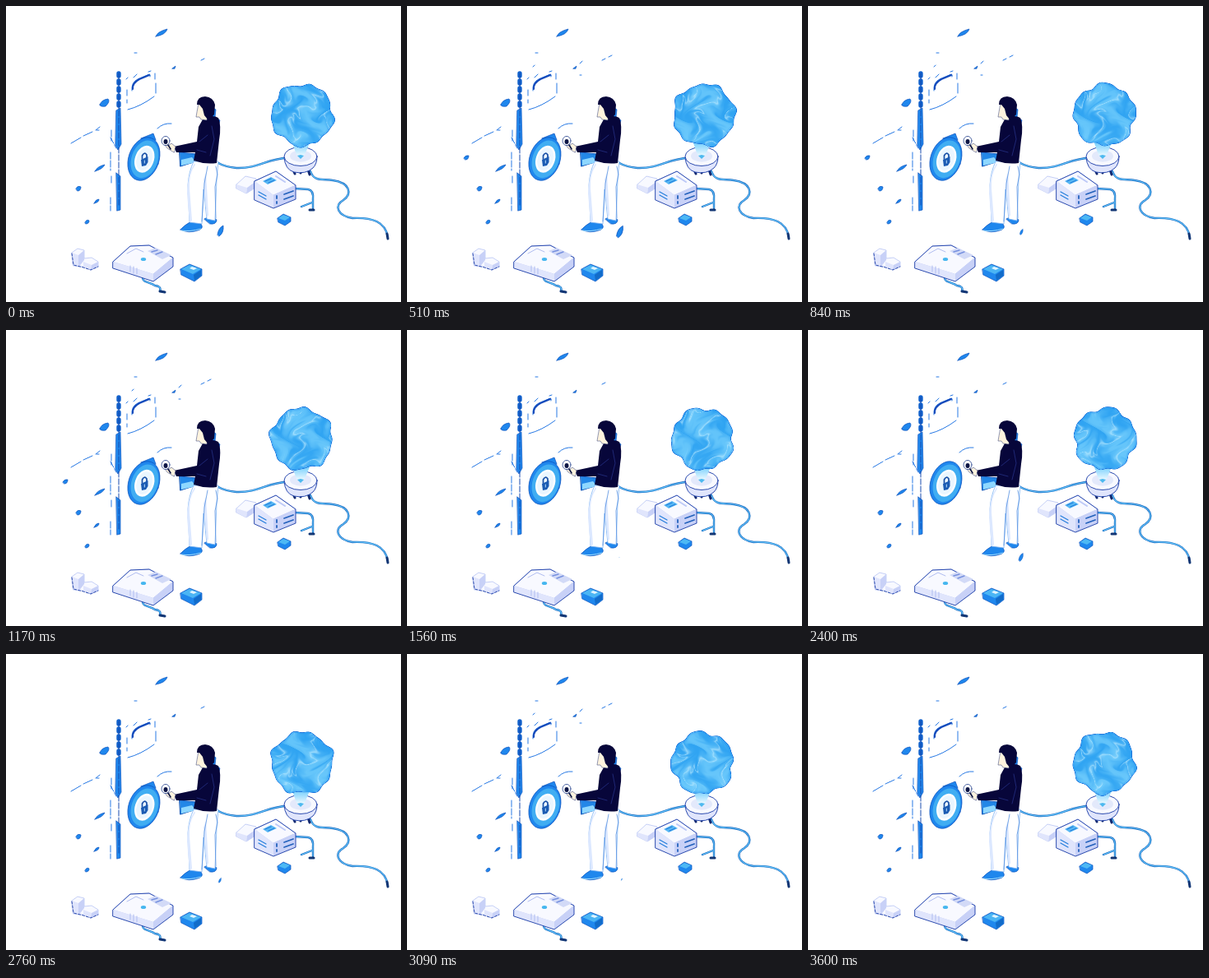
An HTML page with a canvas for the animation above (3.63 s loop, 480 by 360 pixels).

```html
<!DOCTYPE html>
<html lang="en">
<head>
<meta charset="utf-8">
<title>Digital workspace</title>
<style>
html, body { margin: 0; width: 100%; height: 100%; overflow: hidden; background: #fff; }
svg, canvas { position: absolute; left: 0; top: 0; }
canvas { left: 312px; top: 84px; }
svg { fill: none; stroke-linecap: round; stroke-linejoin: round; }
.blue { fill: #1f87ed; stroke: #0b51bd; stroke-width: .7; }
.pale { fill: #fff; stroke: #aebcf3; stroke-width: .7; }
.top { fill: #f8f9ff; }
.left { fill: #e0e5fc; }
.right { fill: #c8d1f7; }
.edge { stroke: #1739a6; stroke-width: .9; }
.line { stroke: #2678e4; stroke-width: 1; }
.navy { fill: #07063a; }
.skin { fill: #fff3de; stroke: #26346f; stroke-width: .5; }
.cord { stroke: #1463bd; stroke-width: 2.4; }
.shine { stroke: #63c5fa; stroke-width: 1.1; }
</style>
</head>
<body>
<svg width="480" height="360" viewBox="0 0 480 360">
  <defs>
    <linearGradient id="beam" x1="0" y1="0" x2="0" y2="1">
      <stop stop-color="#66c9fc"/><stop offset="1" stop-color="#eefaff"/>
    </linearGradient>
  </defs>

  <!-- panel fragments -->
  <g class="blue">
    <path d="M182 37Q184 31 196 28Q194 35 182 37Z"/>
    <path d="M114 120Q116 114 124 113Q127 116 121 122Q114 123 114 120Z"/>
    <path d="M108 201Q111 195 120 193Q118 198 108 201Z"/>
    <path d="M85 222Q87 218 91 220Q91 225 87 225Z"/>
    <path d="M107 240Q109 235 113 235Q113 239 107 240Z"/>
    <path d="M96 263Q98 259 101 261Q101 265 97 265Z"/>
    <path d="M134 127L139 124L140 168L136 175L133 169Z"/>
    <path d="M134 203L139 207V248L135 249Z"/>
    <path d="M202 76L206 73L205 76Z"/>
  </g>
  <path d="M137 82V123" stroke="#1262cd" stroke-width="5.4" stroke-dasharray="3 6"/>
  <path d="M137 82V244" stroke="#164aae" stroke-width="1" stroke-dasharray="7 2"/>
  <path class="line" d="M128 151V164M127 160L134 173M127 178V200M128 207V217M127 233V249" stroke-dasharray="8 2"/>
  <path class="line" d="M79 167L91 160M94 158L105 153M109 151L114 147M110 151H113" stroke-width="1.4"/>
  <path class="line" d="M153 103Q152 93 160 89L174 83Q176 83 175 86M147 102V109M147 114V118M148 126Q164 122 180 110" stroke-width="1.7"/>
  <path class="line" d="M181 82V89M182 94V106M173 80L176 79M155 87L159 83M156 57H159M146 89L148 87" stroke-width=".7"/>
  <path d="M154 101Q153 94 162 89L174 84" stroke="#164bbb" stroke-width="2.2"/>
  <path class="line" d="M184 149Q191 142 201 143" stroke-width="1.6"/>
  <path class="line" d="M237 66L241 64" stroke-width="1.2"/>
  <g id="sparks" class="line"><path d="M210 70L213 67M210 84H212M245 62L249 60M153 74L155 72"/></g>
  <path id="chip" class="blue" d="M69 185Q71 181 75 182Q75 187 71 187Z"/>

  <!-- lock badge -->
  <path id="tip" class="blue" d="M164 161L179 155L182 163Z"/>
  <g transform="translate(167.5 186) rotate(19)">
    <ellipse class="blue" rx="18.5" ry="27"/>
    <ellipse cx="1" rx="16" ry="23.5" fill="#40adf2"/>
    <ellipse cx=".8" rx="11.5" ry="17" fill="#fff"/>
    <ellipse cx=".8" rx="9.5" ry="14.3" fill="#eaf6ff"/>
  </g>
  <path d="M165.5 186V182Q168 177 171 181V184" stroke="#174ea5" stroke-width="1.7"/>
  <path d="M164 187L172.5 183V190L170 194L165 195Z" fill="#1a5bb3"/>
  <path d="M168.3 188V191" stroke="#b9e2ff" stroke-width="1"/>

  <!-- cords -->
  <g id="cords">
    <path d="M256 190Q267 196 280 197C307 198 318 185 342 185"/>
    <path d="M370 201C374 214 385 210 397 212C418 215 421 228 410 236C398 243 403 255 421 258C445 257 461 262 464 281"/>
    <path d="M351 222L367 223Q374 224 373 235V246M372 239L359 244"/>
    <path d="M166 330C166 337 174 335 181 340Q189 341 187 346L192 348"/>
  </g>
  <path d="M463 277L464 283M369 248H374M187 347L193 348" stroke="#123674" stroke-width="3"/>

  <!-- lamp -->
  <path d="M348 197L351 204M367 199L369 205M358 199V203" stroke="#122a70" stroke-width="3"/>
  <path class="left edge" d="M338 184Q339 199 350 202Q364 205 373 197Q378 192 378 183Z"/>
  <ellipse class="top edge" cx="358" cy="183" rx="20" ry="11.5" stroke-width=".6"/>
  <ellipse cx="358" cy="182.5" rx="13" ry="7.2" fill="#e3e9fb"/>
  <path d="M347 164H370L363 181Q358 184 353 181Z" fill="url(#beam)"/>
  <path d="M354 182L358 181L362 182L358 186Z" fill="#4db9ef"/>

  <!-- server and small cube -->
  <path class="pale top" d="M280 217L291 207L304 210L303 221L292 228L280 222Z"/>
  <path class="left" d="M280 217L293 221L292 228L280 222Z"/>
  <path class="right" d="M293 221L304 213L303 221L292 228Z"/>
  <path class="pale top" d="M302 213L328 201L352 218L325 230Z"/>
  <path class="left" d="M302 213L325 230V246L302 236Z"/>
  <path class="right" d="M325 230L352 218V235L325 246Z"/>
  <path class="edge" d="M302 213L328 201L352 218V235L325 246L302 236Z" stroke-width=".6"/>
  <path d="M312 213L322 208L329 212L318 217Z" fill="#58b9f4"/>
  <path d="M315 213L322 210M319 215L326 212M307 226L316 231M307 230L316 235" stroke="#267fdc" stroke-width="1.3"/>
  <path d="M338 229L349 225M338 235L349 231M329 231V234M329 238V240" stroke="#2462bc" stroke-width="1.8"/>
  <path d="M328 207L339 214" stroke="#bdc9f7" stroke-width="2"/>
  <path class="blue" d="M330 258L337 253L346 257V262L339 267L331 263Z"/>
  <path d="M331 258L337 254L345 257L339 261Z" fill="#4db8f4"/>

  <!-- foreground equipment -->
  <path class="pale top" d="M80 300L87 295L95 297V307L104 306L112 311V317L103 321L94 317L82 316Z"/>
  <path class="left" d="M80 300L88 303V318L81 314ZM94 311L104 315L103 321L94 317Z"/>
  <path class="right" d="M88 303L95 297V309L88 318ZM104 315L112 311V317L103 321Z"/>
  <path class="edge" d="M80 301L82 315L94 318L103 321L112 317" stroke-width=".7" stroke-dasharray="3 2"/>
  <path class="pale top" d="M130 311L151 292L174 291L203 306L179 326Z"/>
  <path class="left" d="M130 311L157 319L179 326V335L130 319Z"/>
  <path class="right" d="M179 326L203 306V317L179 335Z"/>
  <path class="edge" d="M130 311L151 292L174 291L203 306V317L179 335L130 319Z" stroke-width=".7"/>
  <path d="M172 298L182 294L201 303L190 308Z" fill="#d2daf7"/>
  <path d="M177 299L184 297M182 302L190 299" stroke="#7791df" stroke-width="1.4"/>
  <path d="M147 301L158 295L167 299M151 316V323M155 317V325M159 319V326" stroke="#b0bdf0"/>
  <ellipse cx="167" cy="308" rx="3.2" ry="2.1" fill="#46b7ef"/>
  <path class="blue" d="M212 320L223 314L238 320V328L229 335L213 327Z"/>
  <path d="M213 320L223 315L237 320L227 326Z" fill="#4bb5f4"/>
  <path d="M226 317L232 319L228 321L223 319Z" fill="#e1f5ff"/>
  <path d="M228 327L237 321V328L229 334Z" fill="#126cc9"/>

  <!-- person -->
  <path d="M211 178L231 180L228 190L212 195Z" fill="#2387e7" stroke="#1457b7"/>
  <path d="M213 187L226 184L231 190L213 194Z" fill="#8ed7ff"/>
  <path class="blue" d="M212 272Q216 267 225 262L237 265Q241 271 233 273Q222 277 212 272Z"/>
  <path class="blue" d="M241 259L249 255L256 260Q256 266 248 265Z"/>
  <path d="M213 273Q223 275 237 271" stroke="#9bdcff"/>
  <path d="M228 189H258L256 211L254 261L244 259L240 223L238 265L223 263L221 218Q222 202 228 189Z" fill="#fff" stroke="#7db4f4" stroke-width=".8"/>
  <path d="M230 193Q222 204 223 222L226 261L223 263L220 228Q220 207 229 191ZM240 211L243 203L246 254L244 258Z" fill="#dce8ff"/>
  <path d="M245 195L241 216L238 262M255 195L257 205L254 220L255 258" stroke="#548fe0" stroke-width=".8"/>
  <path class="blue" d="M249 122L255 126L254 135L260 139L257 149L248 136Z"/>
  <path class="navy" d="M239 138Q250 131 258 136Q262 145 259 163L256 191Q242 193 228 188L230 178L207 178L204 171L232 165L234 147Z"/>
  <path d="M235 165L245 157M232 175L243 178M250 146L253 162L248 182" stroke="#253085" stroke-width=".8"/>
  <path class="skin" d="M234 120L241 118L246 128L244 139L237 138L235 135H231L232 129Z"/>
  <path class="navy" d="M232 120Q232 110 242 110Q252 111 254 120L253 132L246 139L241 133L239 125L235 120Z"/>
  <path class="skin" d="M206 171L201 167L197 170L193 169L196 173L204 178Z"/>
  <ellipse cx="194" cy="164" rx="5" ry="5.6" fill="#fff" stroke="#28458f" stroke-width=".8"/>
  <ellipse cx="194" cy="165" rx="2.5" ry="3" fill="#0c1646"/>
  <path d="M197 169L200 174" stroke="#0c1646" stroke-width="1.6"/>
  <path id="leaf" class="blue" d="M-4 5Q-3 -3 3 -6Q4 3 -2 7Z"/>
</svg>
<canvas width="96" height="96"></canvas>
<script>
const LOOP = 3630, SIZE = 96;
const $ = id => document.getElementById(id);
const ctx = document.querySelector('canvas').getContext('2d');
const pixels = ctx.createImageData(SIZE, SIZE);
const leafPose = [[0, 1, 261, 273], [510, 1.1, 259, 274], [1170, 0, 260, 275],
  [1950, .15, 256, 278], [2400, .75, 259, 276], [3090, .2, 261, 274], [3630, 0, 261, 274]];

for (const path of [...$('cords').children]) {
  path.setAttribute('class', 'cord');
  const highlight = path.cloneNode();
  highlight.setAttribute('class', 'shine');
  $('cords').append(highlight);
}

function poseAt(t) {
  const i = leafPose.findIndex(p => p[0] > t);
  const a = leafPose[i - 1], b = leafPose[i];
  const k = (t - a[0]) / (b[0] - a[0]);
  return a.slice(1).map((v, j) => v + (b[j + 1] - v) * k);
}

function show(id, visible) {
  $(id).style.visibility = visible ? 'visible' : 'hidden';
}

const mix = (a, b, k) => a.map((v, i) => v + (b[i] - v) * k);

// Folded sine waves give the shifting water highlights.
function waterColour(x, y, phase, depth) {
  let u = x * 3.2, v = y * 3.2;
  for (let n = 1; n < 5; n++) {
    u += .65 / n * Math.sin(n * 1.7 * v + phase + n);
    v += .65 / n * Math.sin(n * 1.5 * u - phase + n * 2);
  }
  const vein = Math.pow(1 - Math.abs(Math.sin(u + v * .6)), 5);
  const patch = .5 + .5 * Math.sin(u * 1.4 - v);
  let colour = mix([48, 164, 242], [112, 204, 252], patch * .8 + Math.max(0, y) * .15);
  colour = mix(colour, [194, 237, 255], vein * .65);
  if (depth < 4) colour = mix(colour, [38, 145, 240], .55 * (1 - depth / 4));
  return depth < 1 ? mix(colour, [18, 95, 208], .65) : colour;
}

function drawWater(t) {
  const phase = t / LOOP * Math.PI * 2;
  const cx = 47.5 + Math.sin(phase * 2), cy = 48;
  pixels.data.fill(0);
  for (let y = 0; y < SIZE; y++) for (let x = 0; x < SIZE; x++) {
    const dx = x - cx, dy = y - cy, angle = Math.atan2(dy, dx);
    const radius = 38 + 1.5 * Math.sin(5 * angle + phase * 2)
      + 1.2 * Math.sin(8 * angle - phase * 3) + .7 * Math.sin(13 * angle + phase * 4);
    const depth = radius - Math.hypot(dx, dy);
    if (depth <= 0) continue;
    const colour = waterColour(dx / 38, dy / 38, phase, depth);
    pixels.data.set([...colour, 255 * Math.min(1, depth * 1.5)], (y * SIZE + x) * 4);
  }
  ctx.putImageData(pixels, 0, 0);
}

let last = -1;
function draw(now) {
  let t = Math.floor(now % LOOP / 30) * 30;
  if (t < 60) t = 0;
  if (t !== last) {
    last = t;
    drawWater(t);
    const [scale, x, y] = poseAt(t);
    $('leaf').setAttribute('transform', `translate(${x} ${y}) scale(${scale})`);
    show('chip', t > 300 && t < 1500 || t > 2100 && t < 2300);
    show('sparks', t > 300 && t < 1500 || t > 2850 && t < 3300);
    show('tip', t < 2200 || t > 2700);
  }
  requestAnimationFrame(draw);
}
requestAnimationFrame(draw);
</script>
</body>
</html>
```
